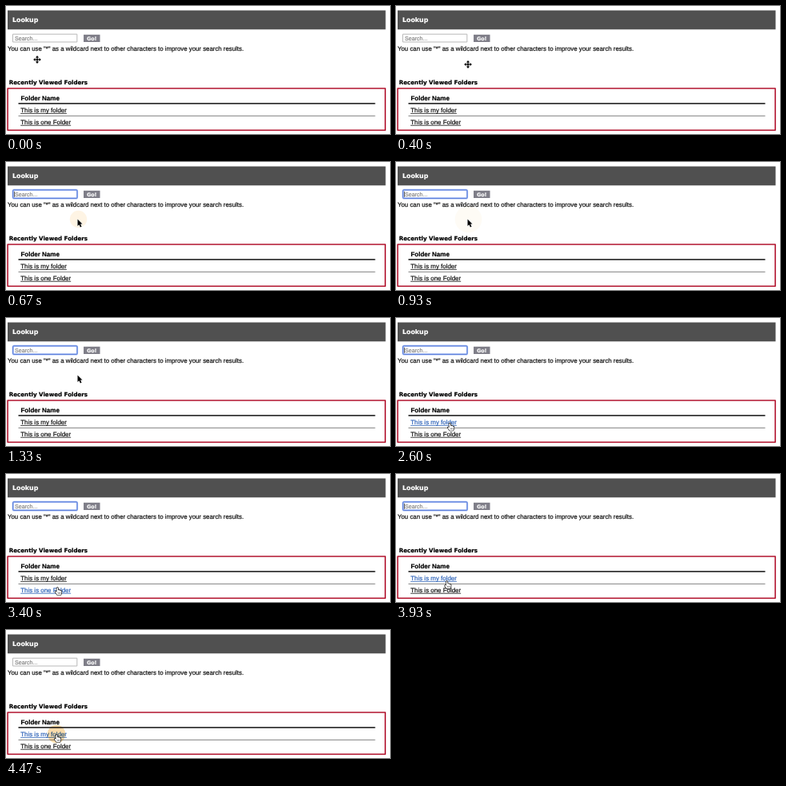
An HTML page with a canvas that plays this animation: 480x160 px, repeating every 4540 ms.

```html
<!DOCTYPE html>
<html lang="en">
<head>
<meta charset="utf-8">
<title>Folder lookup</title>
<style>
  html, body { margin: 0; width: 100%; height: 100%; overflow: hidden; background: #fff; }
  canvas { display: block; width: 480px; height: 160px; }
</style>
</head>
<body>
<canvas id="stage" width="480" height="160"></canvas>
<script>
const ctx = document.getElementById('stage').getContext('2d');
ctx.textRendering = 'geometricPrecision';
const LOOP = 4540;
const FOCUS_AT = 600, BLUR_AT = 4270;
const SANS = '"Liberation Sans", Arial, sans-serif';
const WIDE = '"DejaVu Sans", Verdana, sans-serif';

// Pointer hot spot: time, x, y
const path = [
  [0, 39, 67], [70, 39, 67], [400, 90, 73], [530, 90, 73],
  [600, 89.5, 71.5], [1630, 89.5, 71.5], [1800, 67, 124.5], [2070, 67, 124.5],
  [2530, 67, 130.5], [2600, 67, 130.5], [3000, 64, 141], [3670, 64, 141],
  [4070, 63, 130], [LOOP, 63, 130]
];

const ease = u => u * u * (3 - 2 * u);

function pointerAt(t) {
  const i = Math.max(1, path.findIndex(p => p[0] > t));
  const [t0, x0, y0] = path[i - 1], [t1, x1, y1] = path[i];
  const u = ease((t - t0) / (t1 - t0));
  return { x: x0 + (x1 - x0) * u, y: y0 + (y1 - y0) * u };
}

// A hairline outline gives the small type its slightly heavy weight
function text(str, x, y, font, color) {
  ctx.font = font;
  ctx.fillStyle = ctx.strokeStyle = color;
  ctx.lineWidth = 0.2;
  ctx.lineJoin = 'round';
  ctx.fillText(str, x, y);
  ctx.strokeText(str, x, y);
}

function box(x, y, w, h, color) {
  ctx.fillStyle = color;
  ctx.fillRect(x, y, w, h);
}

function frame(x, y, w, h, color, width, radius = 0) {
  ctx.strokeStyle = color;
  ctx.lineWidth = width;
  ctx.beginPath();
  ctx.roundRect(x, y, w, h, radius);
  ctx.stroke();
}

function link(str, y, hovered) {
  const color = hovered ? '#2c62b8' : '#111';
  text(str, 18.2, y, `7.93px ${SANS}`, color);
  box(18.2, y + 1, ctx.measureText(str).width, 0.8, color);
}

function searchField(t) {
  const focused = t >= FOCUS_AT && t < BLUR_AT;
  if (focused) {
    frame(8.7, 34.9, 80.3, 10.5, '#a9c0f5', 2.2, 1.5);
    frame(8.7, 34.9, 80.3, 10.5, '#5579d8', 1, 1);
  } else {
    frame(8.5, 35.2, 80.3, 9.8, '#b9b9b9', 1);
  }
  text('Search...', 11, 43, `7.1px ${SANS}`, '#858585');
  if (focused && (t - 570) % 1000 < 500) box(10, 36.8, 0.8, 7, '#333');
}

function page(t, y) {
  box(0, 0, 480, 160, '#fff');
  box(2, 5.5, 472.5, 23.8, '#505050');
  text('Lookup', 8, 20.1, `bold 7.9px ${WIDE}`, '#fff');
  searchField(t);
  box(97, 35.8, 20.5, 9.2, '#7f7e88');
  text('Go!', 101, 42.9, `bold 6.3px ${WIDE}`, '#fff');
  text('You can use "*" as a wildcard next to other characters to improve your search results.',
    2, 55.8, `7.83px ${SANS}`, '#111');
  text('Recently Viewed Folders', 3.8, 98.2, `bold 7.1px ${WIDE}`, '#000');
  frame(2.1, 103, 472, 52.2, '#b3152f', 1.6);
  text('Folder Name', 18.4, 117.6, `bold 8px ${SANS}`, '#000');
  box(15.5, 121.2, 446, 1.4, '#000');
  box(15.5, 136.9, 446, 0.9, '#777');
  link('This is my folder', 132.9, y > 125 && y < 136.5);
  link('This is one Folder', 147.8, y > 138);
}

function halo(x, y, radius, alpha) {
  ctx.save();
  ctx.globalCompositeOperation = 'multiply';
  ctx.globalAlpha = alpha;
  ctx.fillStyle = '#f8c980';
  ctx.beginPath();
  ctx.arc(x, y, radius, 0, Math.PI * 2);
  ctx.fill();
  ctx.restore();
}

function clickHalo(t, p) {
  if (t >= FOCUS_AT && t < 1070) {
    const u = (t - FOCUS_AT) / 470;
    halo(p.x + 1, p.y, 9 + 11 * u, 0.25 * (1 - u));
  } else if (t >= BLUR_AT) {
    const u = Math.min(1, (t - BLUR_AT) / 200);
    halo(p.x, p.y, 7 + 4.2 * u, 0.35 + 0.3 * u);
  }
}

function moveCursor() {
  for (let i = 0; i < 4; i++) {
    ctx.rotate(Math.PI / 2);
    box(-0.6, -3.5, 1.2, 4, '#000');
    ctx.beginPath();
    ctx.moveTo(0, -4.9);
    ctx.lineTo(2.1, -2.5);
    ctx.lineTo(-2.1, -2.5);
    ctx.fill();
  }
}

function shape(d, fill, stroke, width) {
  const p = new Path2D(d);
  ctx.lineJoin = 'round';
  ctx.lineWidth = width;
  ctx.strokeStyle = stroke;
  ctx.stroke(p);
  ctx.fillStyle = fill;
  ctx.fill(p);
}

function arrowCursor() {
  shape('M0 0V8.4L1.9 6.7L3.4 10L5 9.3L3.5 6.1H6Z', '#000', '#fff', 1);
}

function handCursor() {
  ctx.translate(0.3, 0.8);
  ctx.scale(0.85, 0.85);
  shape('M-1 1Q0-.6 1 1V4Q2.2 3.3 2.7 4.4Q4 3.8 4.4 4.9Q6 4.6 6 6V8L5 11H-.2L-3 7.2Q-3.3 5.8-1.9 6.1L-1 7Z',
    '#fff', '#111', 1.6);
  ctx.lineWidth = 0.6;
  ctx.stroke(new Path2D('M1 7.3V9.3M2.7 7.3V9.3M4.3 7.3V9.3'));
}

function draw(now) {
  const t = now % LOOP;
  const p = pointerAt(t);
  page(t, p.y);
  clickHalo(t, p);
  ctx.save();
  ctx.translate(p.x, p.y);
  if (t < FOCUS_AT) moveCursor();
  else if (p.y < 120) arrowCursor();
  else handCursor();
  ctx.restore();
}

const start = performance.now();
function tick() {
  draw(performance.now() - start);
  requestAnimationFrame(tick);
}
tick();
</script>
</body>
</html>
```
